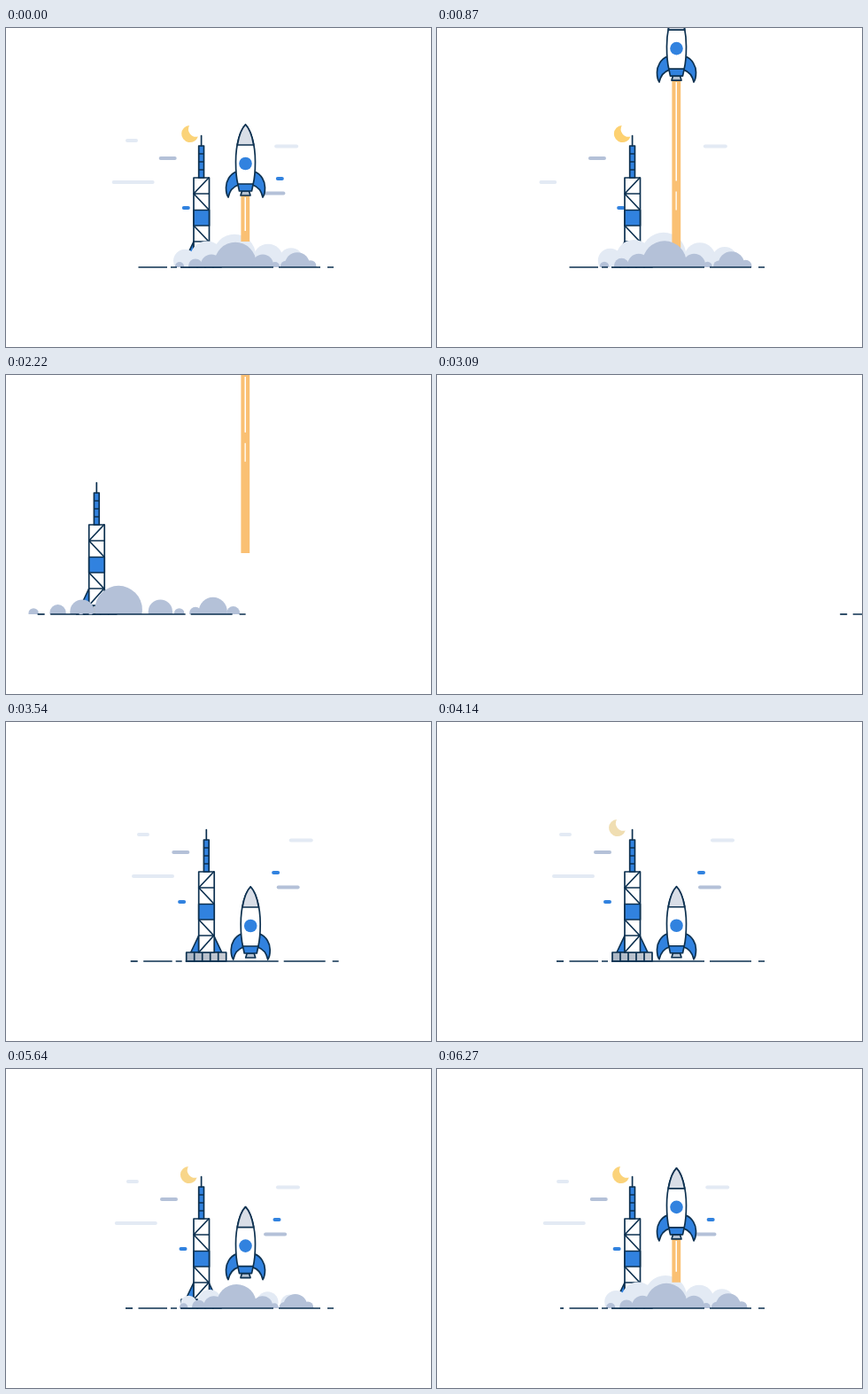
Animation of 480x360 px, one loop 6.3 s. Source, as an HTML page:

```html
<!DOCTYPE html>
<html lang="en">
<head>
<meta charset="utf-8">
<title>Rocket launch</title>
<style>
  html, body { margin: 0; width: 100%; height: 100%; overflow: hidden; background: #fff; }
  svg { display: block; width: 100%; height: 100%; }
  .ink { stroke: #0d3150; stroke-width: 1.7; stroke-linejoin: round; stroke-linecap: round; }
  .flat { stroke-linecap: butt; }
  .blue { fill: #3182df; }
  .white { fill: #fff; }
  .none { fill: none; }
</style>
</head>
<body>
<svg viewBox="0 0 480 360" xmlns="http://www.w3.org/2000/svg">
  <defs>
    <clipPath id="above"><rect x="-600" y="0" width="1700" height="270"/></clipPath>
    <linearGradient id="steel"><stop offset="0" stop-color="#a9b5c4"/><stop offset="1" stop-color="#c9cdd4"/></linearGradient>
  </defs>
  <g id="clouds" stroke-linecap="round"></g>
  <path id="moon" d="M-0.500,-9.600 A9.600,9.600 0 1 0 9.300,3 A8.700,8.700 0 0 1 -0.500,-9.600Z"/>
  <g id="tower" class="ink">
    <path class="blue" d="M212,241 L203,260 H212Z M229,241 L238,260 H229Z"/>
    <path d="M198,260 H243 V270 H198Z" fill="url(#steel)"/>
    <path class="none" d="M207,260 V270 M216,260 V270 M225,260 V270 M234,260 V270"/>
    <path class="white" d="M212,169 H229.500 V260 H212Z"/>
    <path class="none" d="M229,169 L212,187 H229 M212,187 L229,205 M212,223 L229,241 H212 M229,241 L212,260"/>
    <path class="blue" d="M212,205.500 H229.500 V223 H212Z"/>
    <path class="blue" d="M217.700,133 H223.500 V169 H217.700Z"/>
    <path class="none" d="M220.600,121.500 V133 M218,142 H223 M218,151 H223 M218,160 H223"/>
  </g>
  <g clip-path="url(#above)"><g id="haze" fill="#e3eaf4"></g></g>
  <rect id="jet" x="265.400" width="9.800" fill="#fac073"/>
  <rect id="gapA" class="white" x="269.500" width="1.500"/>
  <rect id="gapB" class="white" x="269.500" width="1.300"/>
  <g id="rocket" class="ink">
    <path id="fin" class="blue" d="M10,9 C18,12 22,20 22,27 C22,32 21,36 19.500,38 C18,31 14,26 8,24Z"/>
    <use href="#fin" transform="scale(-1 1)"/>
    <path fill="#b4c1d0" d="M-4,31 H4 L5.500,36 H-5.500Z"/>
    <path class="white" d="M0,-44 C6,-38 11,-22 11,-2 C11,8 10,18 8.500,24 H-8.500 C-10,18 -11,8 -11,-2 C-11,-22 -6,-38 0,-44Z"/>
    <path fill="#d9dee7" d="M0,-44 C4.500,-39.500 7.500,-31 9.200,-21 H-9.200 C-7.500,-31 -4.500,-39.500 0,-44Z"/>
    <path class="blue" d="M-8.700,23 H8.700 L7,31 H-7Z"/>
    <circle class="blue" r="7.300" stroke="none"/>
  </g>
  <g clip-path="url(#above)"><g id="smoke" fill="#b4c1d8"></g></g>
  <g id="ground" class="ink flat">
    <path id="dash"/>
    <path d="M149.500,270 H182 M186,270 H193 M197,270 H302 M308,270 H355 M363,270 H370"/>
  </g>
</svg>
<script>
// All times are in ms; the scene runs from its empty stage at START for one LOOP.
const LOOP = 6300, START = 3000, LIFT = 6300;
const PALE = '#e3eaf4', GREY = '#b4c1d8', BLUE = '#3182df';

const $ = id => document.getElementById(id);
const clamp = v => Math.max(0, Math.min(1, v));
const span = (t, a, b) => clamp((t - a) / (b - a));
const easeOut = (t, a, b, p) => 1 - Math.pow(1 - span(t, a, b), p);
const move = (id, x, y) => $(id).setAttribute('transform', `translate(${x} ${y})`);

function set(el, attrs) {
  for (const k in attrs) el.setAttribute(k, attrs[k]);
}
function add(parent, tag) {
  const el = document.createElementNS('http://www.w3.org/2000/svg', tag);
  return $(parent).appendChild(el);
}

// hide: the moment a cloud shrinks to nothing
const cloud = (x, y, w, col, hide = Infinity) => ({ x, y, w, col, hide, el: add('clouds', 'line') });
const puff = (parent, x, r) => ({ x, r, el: add(parent, 'circle') });

const clouds = [
  cloud(138, 127, 14, PALE, 7170), cloud(309, 133.5, 27, PALE),
  cloud(177, 147, 20, GREY), cloud(130, 174, 48, PALE, 7500),
  cloud(294, 170, 9, BLUE, 7170), cloud(295, 186.5, 26, GREY, 7170),
  cloud(188, 203, 9, BLUE)
];
const smoke = [[196, 5], [214, 8], [232, 12], [259, 23.5], [290, 12], [304, 5], [316, 6], [329, 14], [344, 6.5]]
  .map(p => puff('smoke', ...p));
const haze = [[202, 13], [227, 19], [258, 24], [296, 17], [322, 14]]
  .map(p => puff('haze', ...p));

const enter = t => 380 * (1 - easeOut(t, 3060, 3800, 4));
const leave = t => 380 * Math.pow(Math.max(0, t - 7550) / 1300, 4);
// things further left leave sooner
const haste = x => 11 - x / 38;

function climb(t) {
  const s = Math.max(0, t - 3950) / 1000;
  return 7.08 * s * s + 1.24 * s ** 4;
}

function drawSky(t) {
  const age = (t - 4140) / 1000, inX = 1.6 * enter(t), outX = leave(t);
  for (const { x, y, w, col, hide, el } of clouds) {
    const blue = col === BLUE;
    const fade = blue ? 1 : 1 - span(t, 7550, 8300);
    const len = w * fade * clamp(Math.abs(t - hide) / 800);
    const thick = Math.min(4, len);
    const left = x + (blue ? 5 : -w / 10) * age + inX - haste(x) * outX;
    set(el, {
      x1: left + thick / 2, x2: left + len - thick / 2 + 0.01, y1: y, y2: y,
      stroke: col, 'stroke-width': thick, visibility: len > 0.2 ? 'visible' : 'hidden'
    });
  }
  const warm = span(t, 4140, 6600);
  move('moon', 203.5 + 1.9 * age - haste(203) * outX, 119.5);
  set($('moon'), {
    opacity: span(t, 3740, 4050),
    fill: `rgb(${240 + 13 * warm},${222 - 13 * warm},${178 - 65 * warm})`
  });
}

function drawPuffs(list, t, size, rise) {
  const u = (t - LIFT) / 1900;
  const spread = 1 + 0.12 * u + 0.24 * u ** 3;
  for (const { x, r, el } of list) {
    const rad = r * size;
    set(el, { cx: 285 + (x - 285) * spread, cy: 270 - rise * rad, r: rad });
  }
}

function drawFlame(t, nozzle) {
  const s = (t - LIFT) / 1000;
  const left = 1 - span(t, 8280, 8790) ** 2;
  const top = Math.max(0, nozzle);
  const bottom = (241 + 8 * s) * left;
  const end = (230 - 66 * s) * left;
  const bar = (id, a, b) => set($(id), { y: a, height: Math.max(0, b - a) });
  bar('jet', top, bottom);
  bar('gapA', top + 2, Math.min(end, bottom - 12));
  bar('gapB', Math.max(top + 2, end + 12), Math.min(end + 33, bottom - 8));
}

function draw(ms) {
  const t = ms < START ? ms + LOOP : ms;
  const inX = enter(t), outX = leave(t);

  drawSky(t);
  for (const id of ['tower', 'smoke', 'haze']) move(id, inX - outX, 0);
  move('ground', inX - 0.84 * outX, 0);

  const grown = 1 + 0.12 * (t - LIFT) / 1900;
  drawPuffs(smoke, t, easeOut(t, 4400, 5600, 3) * grown, 0.2);
  drawPuffs(haze, t, easeOut(t, 5000, 6300, 2) * grown * (1 - span(t, 7200, 7950)), 0.55);

  const y = 230 - climb(t);
  move('rocket', 270.5 + inX, y);
  $('rocket').style.display = y < -50 ? 'none' : '';
  drawFlame(t, y + 36);

  const cut = span(t, 6240, LIFT) - span(t, 7500, 7900);
  $('dash').setAttribute('d', `M${135 + 8 * cut},270 H143`);
}

const t0 = performance.now();
function tick() {
  draw((performance.now() - t0) % LOOP);
  requestAnimationFrame(tick);
}
draw(0);
requestAnimationFrame(tick);
</script>
</body>
</html>
```
